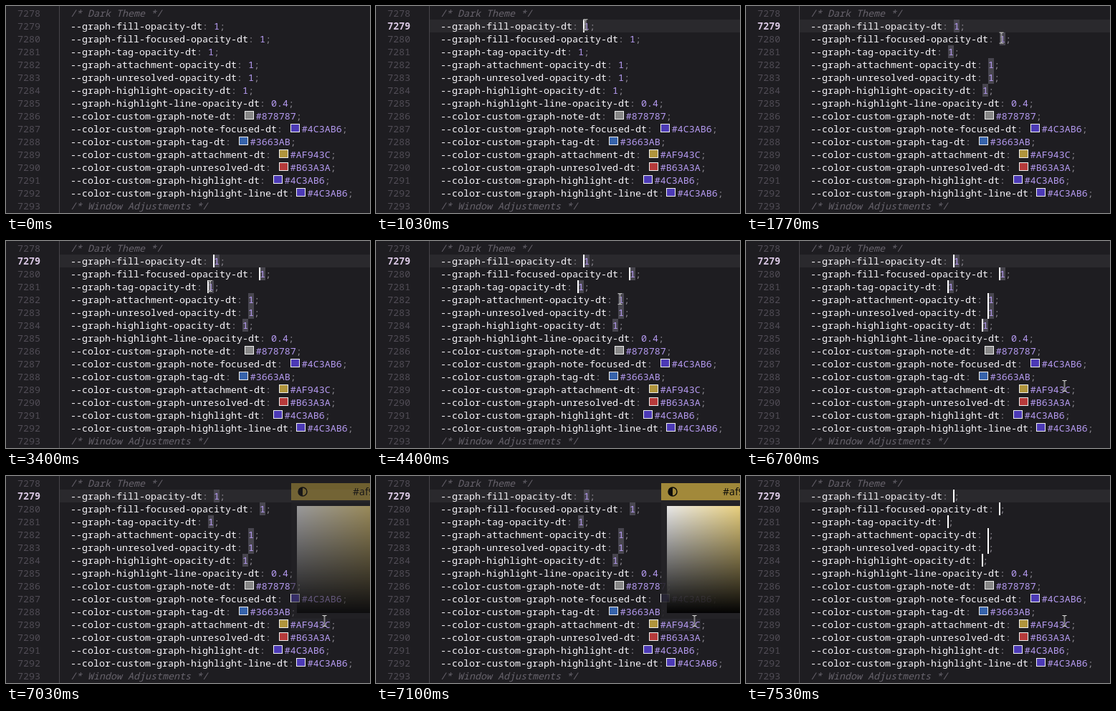
Animation of 508 by 290 pixels, one loop 8000 ms. Source, as an HTML page:

```html
<!DOCTYPE html>
<html lang="en">
<head>
<meta charset="utf-8">
<style>
  html, body { margin: 0; width: 508px; height: 290px; overflow: hidden; background: #1e1d21; }
  #stage { position: relative; width: 508px; height: 290px; overflow: hidden;
    font: 500 13.333px/18px "Noto Sans Mono", monospace; font-variant-ligatures: none; color: #f8f6fa; }
  #stage * { position: absolute; white-space: pre; box-sizing: border-box; }
  .no { left: 16px; color: #504c55; font-weight: 300; }
  .comment { color: #68646d; font-style: italic; font-weight: 400; }
  .punct { color: #87848c; }
  .num { color: #b69bf2; }
  .swatch { width: 13px; height: 12px; border: 1px solid #f0f0f0; }
  .guide { left: 74px; top: 0; width: 1px; height: 290px; background: #47454b; }
  .band { left: 75px; top: 19px; width: 433px; height: 18px; background: #2a292d; }
  .word { width: 8px; height: 18px; background: #48464f; }
  .caret { width: 2px; height: 18px; background: #fff; }
  .hover { left: 397px; top: 199px; width: 56px; height: 18px; background: #2c2b32; }
  .picker { left: 398px; top: 10px; width: 302px; height: 190px; background: #242327; }
  .head { left: 0; top: 0; width: 302px; height: 24px; background: #af943c; color: #0c0b08; }
  .hex { left: 86px; top: 3px; font: 14px/18px "Noto Sans", sans-serif; }
  .shade { left: 8px; top: 32px; width: 220px; height: 150px;
    background: linear-gradient(transparent, #000), linear-gradient(90deg, #fff, #ffc400); }
  svg { left: 0; top: 0; overflow: visible; }
</style>
</head>
<body>
<div id="stage"></div>
<script>
const LOOP = 8000, BLINK = 500, CHAR = 8, LINE = 18, LEFT = 90, FIRST = 7278;
const SELECT = 1270, ERASE = 7430;
const HARD = 'steps(1, end)', GLIDE = 'cubic-bezier(.2, .6, .4, 1)';
const stage = document.getElementById('stage');

const opacities = ['fill', 'fill-focused', 'tag', 'attachment', 'unresolved', 'highlight', 'highlight-line'];
const colors = { note: '#878787', 'note-focused': '#4C3AB6', tag: '#3663AB', attachment: '#AF943C',
  unresolved: '#B63A3A', highlight: '#4C3AB6', 'highlight-line': '#4C3AB6' };
const rows = [
  ['/* Dark Theme */'],
  ...opacities.map(n => [`--graph-${n}-opacity-dt`, n === 'highlight-line' ? '0.4' : '1']),
  ...Object.entries(colors).map(([n, c]) => [`--color-custom-graph-${n}-dt`, c]),
  ['/* Window Adjustments */']
];

// When the pointer sets off for each "1", and when it clicks there
const moves = [130, 1240, 2500, 3400, 4700, 5740];
const clicks = [1030, 2330, 3230, 4500, 5600, 6430];

// Every click or edit restarts the shared blink
const resets = [...clicks, ERASE];
const blink = resets.flatMap((from, i) => {
  const end = resets[i + 1] || from + BLINK;
  const count = Math.ceil((end - from) / BLINK);
  return Array.from({ length: count }, (_, k) => [from + k * BLINK, 1 - k % 2]);
});

function add(cls, x, y, text = '', parent = stage) {
  const el = document.createElement('div');
  el.className = cls;
  if (x !== null) { el.style.left = x + 'px'; el.style.top = y + 'px'; }
  el.textContent = text;
  return parent.appendChild(el);
}

// Plays a list of [time, value] steps, holding the last value
function play(el, prop, steps, easing = HARD) {
  const keys = [...steps, [LOOP, steps[steps.length - 1][1]]]
    .map(([t, v]) => ({ offset: t / LOOP, [prop]: v, easing }));
  el.animate(keys, { duration: LOOP, iterations: Infinity });
}

const shift = (x, y) => `translate(${x}px, ${y}px)`;
const valueX = name => LEFT + (name.length + 2) * CHAR;

play(add('band'), 'opacity', [[0, 0], [clicks[0], 1]]);
add('guide');

const fade = [[0, 0], [6920, 0], [7120, 1], [7400, 1], [7500, 0]];
play(add('hover'), 'opacity', fade, 'linear');

rows.forEach(([name, value], i) => {
  const y = 1 + i * LINE;
  const no = add('no', 16, y, FIRST + i);
  if (i === 1) {
    play(no, 'color', [[0, '#504c55'], [clicks[0], '#d8c6e2']]);
    play(no, 'fontWeight', [[0, 300], [clicks[0], 700]]);
  }
  if (!value) return add('comment', LEFT, y, name);

  add('', LEFT, y, name);
  add('punct', LEFT + name.length * CHAR, y, ':');
  let x = valueX(name);
  if (value[0] === '#') {
    if (i === rows.length - 2) x -= CHAR; // last colour has no space
    add('swatch', x + 3, y + 2).style.background = value;
    x += 18.67;
  }
  const word = value === '1' && add('word', x, y);
  const num = add('num', x, y, value);
  const semi = add('punct', x + value.length * CHAR, y, ';');
  if (!word) return;

  const born = clicks[i - 1];
  play(word, 'opacity', [[0, 0], [SELECT, 1], [ERASE, 0]]);
  play(num, 'opacity', [[0, 1], [ERASE, 0]]);
  play(semi, 'transform', [[0, shift(0, 0)], [ERASE, shift(-CHAR, 0)]]);
  play(add('caret', x - 1, y), 'opacity', [[0, 0], ...blink.filter(([t]) => t >= born)]);
});

const picker = add('picker');
const head = add('head', null, 0, '', picker);
head.innerHTML = `<svg width="32" height="24"><circle cx="16" cy="12" r="6" fill="none"
  stroke="#0c0b08" stroke-width="1.5"/><path d="M16 6a6 6 0 0 0 0 12z" fill="#0c0b08"/></svg>`;
add('hex', null, 0, '#af943c', head);
add('shade', null, 0, '', picker);
play(picker, 'opacity', fade, 'linear');

const mouse = add('', 0, 0);
const beam = 'M-3 -7.5H-1L0 -6.5L1 -7.5H3M0 -6.5V6.5M-3 7.5H-1L0 6.5L1 7.5H3';
mouse.innerHTML = `<svg width="1" height="1" fill="none"><path d="${beam}" stroke="#111"
  stroke-opacity=".6" stroke-width="2.4"/><path d="${beam}" stroke="#e4e4e4" stroke-width="1.1"/></svg>`;

// Glide from one value to the next, then dart to the colour
let here = shift(263, 10);
const path = [[0, here]];
function travel(start, time, to) {
  path.push([start, here], [start + time, to]);
  here = to;
}
moves.forEach((start, i) => {
  travel(start, 530, shift(valueX(rows[i + 1][0]) + 2.5, 8 + 18.3 * (i + 1)));
});
travel(6570, 130, shift(444.5, 203));
play(mouse, 'transform', path, GLIDE);
play(mouse, 'opacity', [[0, 0], [moves[0], 1]]);
</script>
</body>
</html>
```
